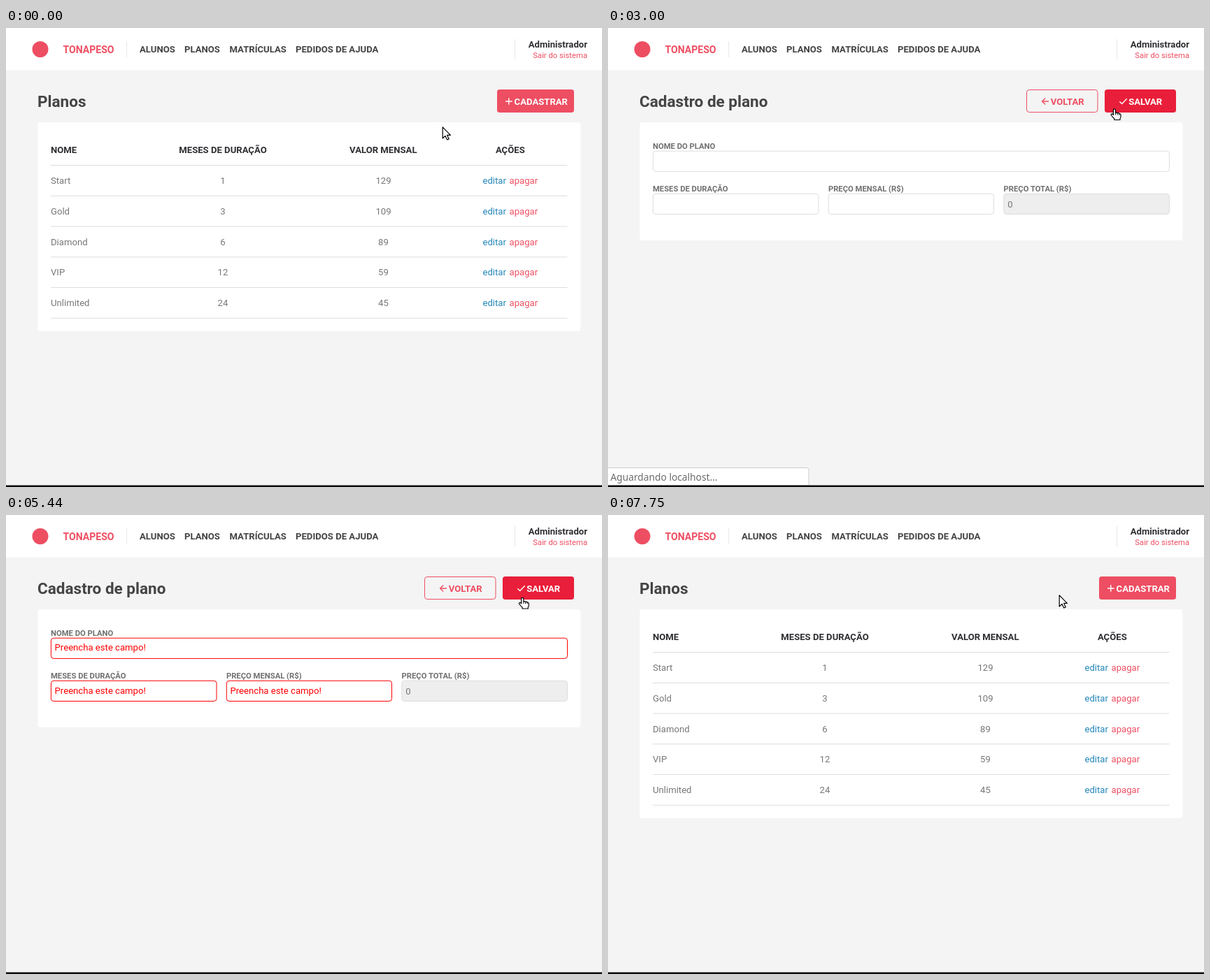
Recreate the animation shown at these times as an HTML page. Size 852 by 657 pixels, loop 8 s.

```html
<!DOCTYPE html>
<html lang="pt-BR">
<head>
<meta charset="utf-8">
<title>Planos</title>
<style>
  html, body { margin: 0; width: 100%; height: 100%; overflow: hidden; background: #f4f4f4; }
  svg { display: block; width: 852px; height: 657px; }
  text { font: 13.13px Roboto, sans-serif; fill: #777; }
  .b { font-weight: 700; fill: #444; }
  .dark { fill: #2f2f33; }
  .title { font-size: 22.5px; }
  .label { font-size: 11.25px; font-weight: 700; fill: #707070; }
  .mid { text-anchor: middle; }
  .end { text-anchor: end; }
  .red { fill: #ee4e62; }
  .blue { fill: #2286b9; }
  .white { fill: #fff; }
  .line { stroke: #ddd; }
  .icon { fill: none; stroke: #fff; stroke-width: 1.4; }
  .input { fill: #fff; stroke: #ddd; }
  .error { fill: #f00; }
  .invalid .input { stroke: #f00; }
  .status { font: 13.75px "Noto Sans", sans-serif; fill: #6b6b6b; }
  .cursor path { fill: #fff; stroke: #000; stroke-width: 1.2; stroke-linejoin: round; }
</style>
</head>
<body>
<svg viewBox="0 0 852 657">
  <rect width="852" height="657" fill="#f4f4f4"/>
  <rect width="852" height="60.5" fill="#fff"/>
  <circle class="red" cx="49" cy="30.5" r="11.5"/>
  <text class="b red" x="81.5" y="35.5" style="font-size:14.06px">TONAPESO</text>
  <path class="line" d="M172.5 19V42M727.5 16V45" style="stroke:#e8e8e8"/>
  <text class="b" x="191" y="35.3">ALUNOS</text>
  <text class="b" x="255" y="35.3">PLANOS</text>
  <text class="b" x="319.5" y="35.3">MATRÍCULAS</text>
  <text class="b" x="414" y="35.3">PEDIDOS DE AJUDA</text>
  <text class="b dark end" x="831" y="28">Administrador</text>
  <text class="red end" x="831" y="43" style="font-size:11.25px">Sair do sistema</text>

  <g id="list">
    <text class="b title" x="45" y="112.8">Planos</text>
    <rect id="create" x="702" y="88" width="110" height="33" rx="3.75"/>
    <path class="icon" d="M714 105H723.6M718.8 100.2V109.8"/>
    <text class="b white end" x="803" y="109.6">CADASTRAR</text>
    <rect x="45.5" y="135" width="775.8" height="299" rx="3.75" fill="#fff"/>
    <g id="rows"></g>
  </g>

  <g id="form">
    <text class="b title" x="45" y="112.8">Cadastro de plano</text>
    <rect id="back" x="598.5" y="88.5" width="101.5" height="32" rx="3.75" stroke="#ee4e62"/>
    <path class="icon" d="M630 105H620.8M625.2 100.4L620.6 105L625.2 109.6" style="stroke:#ee4e62"/>
    <text class="b red" x="632.7" y="109.6">VOLTAR</text>
    <rect id="save" x="710" y="88" width="102" height="33" rx="3.75"/>
    <path class="icon" d="M731.3 105.2L734.7 108.6L741.7 101.2"/>
    <text class="b white" x="744.2" y="109.6">SALVAR</text>
    <rect x="45.5" y="135" width="775.8" height="169" rx="3.75" fill="#fff"/>
    <g id="fields"></g>
    <text class="label" x="565.6" y="234.3">PREÇO TOTAL (R$)</text>
    <rect x="565.8" y="237.3" width="236.7" height="29.2" rx="3.75" fill="#eee" stroke="#ddd"/>
    <text x="571.3" y="256.7">0</text>
  </g>

  <g id="status">
    <path d="M-1 629.5H283.5Q287 629.5 287 633V655H-1Z" fill="#fff" stroke="#ccc"/>
    <text class="status" x="3.5" y="648">Aguardando localhost...</text>
  </g>
  <rect y="654.5" width="852" height="2.5" fill="#0c0c0c"/>

  <g id="cursor" class="cursor">
    <path id="arrow" d="M.2 .8V17L4 13.4L6.7 19L9.2 17.9L6.7 12.4H11.4Z"/>
    <g id="hand">
      <path d="M-1.6 2Q-1.6 .4 0 .4T1.6 2V6Q3.2 5 4.3 6.4Q6 5.7 6.9 7.1Q8.8 6.8 9 9V11.5Q8.8 13 8 14V16H-.2V14.2Q-2.5 12.4 -4.8 9Q-5 7 -3.2 7.4L-1.6 8.9Z"/>
      <path d="M1.6 6V9M4.3 6.6V9.2M6.9 7.2V9.4" style="stroke-width:.9"/>
    </g>
  </g>
</svg>
<script>
const LOOP = 8000, RED = '#ee4e62', DARK_RED = '#e91e3a';
const el = id => document.getElementById(id);
const text = (cls, x, y, s) => `<text class="${cls}" x="${x}" y="${y}">${s}</text>`;
const rule = y => `<path class="line" d="M64 ${y}H802.5"/>`;

const plans = [['Start', 1, 129], ['Gold', 3, 109], ['Diamond', 6, 89], ['VIP', 12, 59], ['Unlimited', 24, 45]];
el('rows').innerHTML =
  text('b dark', 64, 179.2, 'NOME') + text('b dark mid', 310, 179.2, 'MESES DE DURAÇÃO') +
  text('b dark mid', 539.3, 179.2, 'VALOR MENSAL') + text('b dark mid', 720.8, 179.2, 'AÇÕES') + rule(196.5) +
  plans.map(([name, months, price], i) => {
    const y = 223 + i * 43.75;
    return text('', 64, y, name) + text('mid', 310, y, months) + text('mid', 539.5, y, price) +
      text('blue', 681.5, y, 'editar') + text('red', 719.5, y, 'apagar') + rule(y + 17.3);
  }).join('');

const field = (x, y, w, label) => text('label', x - .4, y - 3, label) +
  `<rect class="input" x="${x}" y="${y}" width="${w}" height="29.2" rx="3.75"/>` +
  text('error', x + 5.2, y + 18.2, 'Preencha este campo!');
el('fields').innerHTML = field(64.4, 176.2, 738.1, 'NOME DO PLANO') +
  field(64.4, 237.3, 236.6, 'MESES DE DURAÇÃO') + field(315.3, 237.3, 236.2, 'PREÇO MENSAL (R$)');
const errors = document.querySelectorAll('.error');

// Pointer path: time, x, y
const path = [
  [0, 624, 141], [1190, 624, 141], [1500, 687, 140], [1999.9, 687, 140], [2000, 724, 115.5],
  [3200, 724, 115.5], [3500, 727, 124], [3750, 733, 130], [4000, 738, 126], [4070, 738, 126],
  [4130, 738, 121.5], [4250, 737, 114], [5250, 737, 114], [5440, 738.3, 118], [5640, 738.3, 118],
  [5780, 728, 132], [5960, 698, 146], [6150, 668, 139], [6310, 652, 122], [6440, 645, 114], [LOOP, 645, 114]
];

function pointerAt(t) {
  const i = path.findIndex(key => key[0] > t);
  const [t0, x0, y0] = path[i - 1], [t1, x1, y1] = path[i];
  const k = (t - t0) / (t1 - t0);
  return [x0 + (x1 - x0) * k, y0 + (y1 - y0) * k];
}

const show = (node, on) => node.style.display = on ? '' : 'none';

function draw(now) {
  const t = now % LOOP;
  const inForm = t >= 3000 && t < 7750, invalid = t >= 4880;
  const [x, y] = pointerAt(t);
  const over = (left, right) => y >= 88 && y <= 121 && x >= left && x <= right;
  const onCreate = !inForm && over(702, 812);
  const onBack = inForm && over(598, 700), onSave = inForm && over(710, 812);
  const clickable = onCreate || onBack || onSave;

  show(el('list'), !inForm);
  show(el('form'), inForm);
  show(el('status'), t >= 3000 && t < 3500);
  el('create').setAttribute('fill', onCreate ? DARK_RED : RED);
  el('save').setAttribute('fill', onSave ? DARK_RED : RED);
  el('back').setAttribute('fill', onBack ? '#fdedef' : '#f4f4f4');
  el('fields').classList.toggle('invalid', invalid);
  errors.forEach(node => show(node, invalid));
  show(el('arrow'), !clickable);
  show(el('hand'), clickable);
  el('cursor').setAttribute('transform', `translate(${x} ${y})`);
  requestAnimationFrame(draw);
}
draw(performance.now());
</script>
</body>
</html>
```
